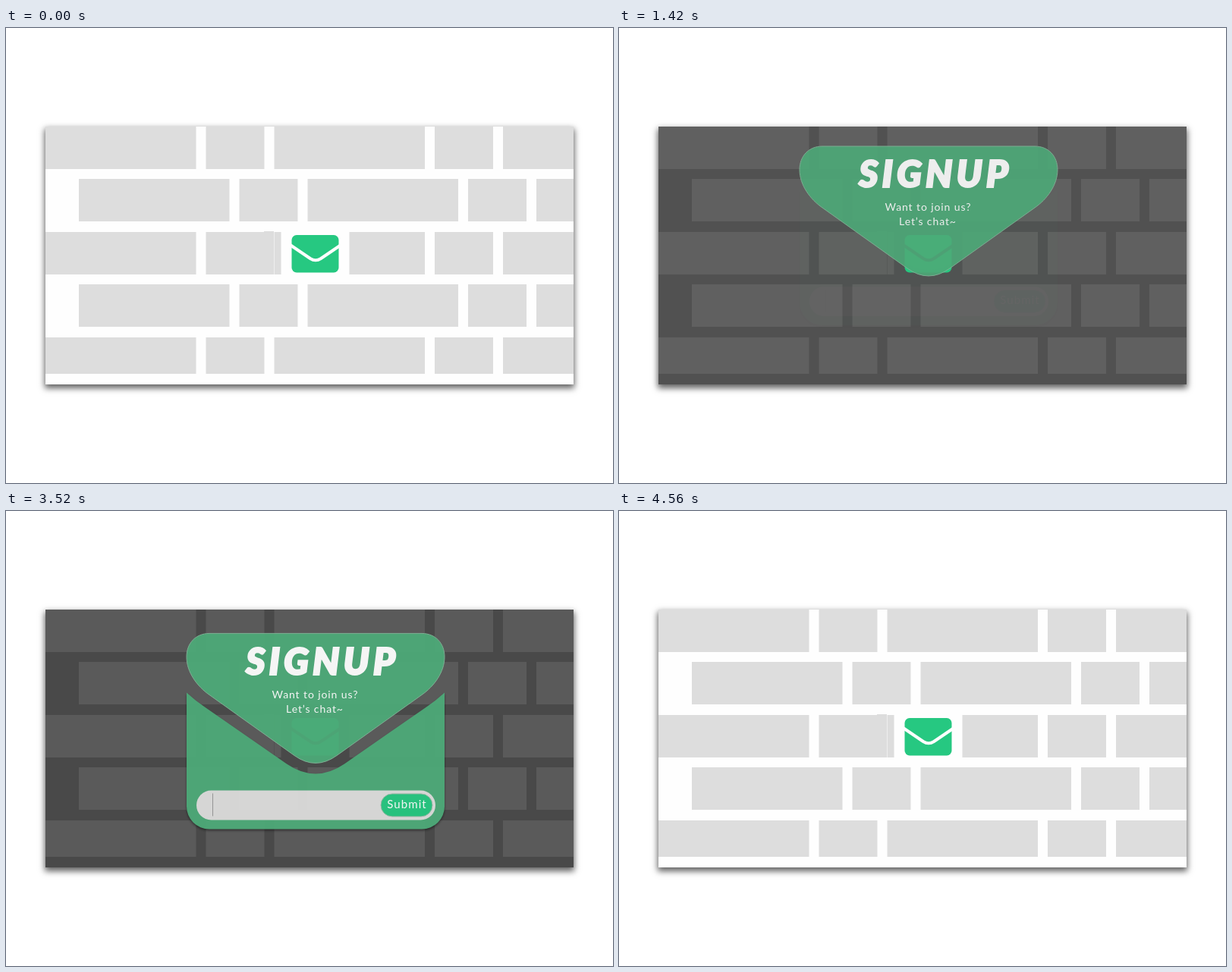
Write an HTML page that moves like this. It is 800 by 600 pixels and loops after 4.62 s.

```html
<!DOCTYPE html>
<html lang="en">
<head>
<meta charset="utf-8">
<title>Envelope signup</title>
<style>
  html, body { margin: 0; width: 100%; height: 100%; overflow: hidden; background: #fff; }
  #card { position: absolute; left: 52px; top: 130px; width: 696px; height: 340px; overflow: hidden; box-shadow: 0 4px 8px 1px rgba(0, 0, 0, .62); }
  svg { display: block; font-family: Lato, sans-serif; }
  text { fill: #fff; text-anchor: middle; font-size: 14px; letter-spacing: .9px; }
  #title { font-size: 49px; font-weight: 900; font-style: italic; letter-spacing: 5px; stroke: #fff; stroke-width: 2px; }
  #submit { font-size: 15px; letter-spacing: 1.1px; }
  #body { filter: drop-shadow(0 2px 1.5px rgba(0, 0, 0, .45)); }
</style>
</head>
<body>
<div id="card">
<svg width="696" height="340" viewBox="52 130 696 340">
  <rect id="wall" x="52" y="130" width="696" height="340"/>
  <path id="bricks"/>
  <rect id="opening" x="362.500" y="268" width="90" height="57"/>
  <rect x="376.500" y="273" width="62" height="49.500" rx="6.500" fill="#26c881"/>
  <path id="fold" d="M373 285L401 304Q408 308.500 415 304L443 285" fill="none" stroke-width="4"/>
  <g id="body">
    <path d="M238 246Q250 257 262 265L370 340Q408 366 446 340L554 265Q566 257 578 246V396A30 30 0 0 1 548 426H268A30 30 0 0 1 238 396Z" fill="#4daa78"/>
    <rect x="251" y="375" width="315" height="39" rx="19.500" fill="#dededd"/>
    <path d="M272.500 379V409" stroke="#999"/>
    <rect x="494" y="379.500" width="68" height="30" rx="15" fill="#26c881" stroke="#9dbcaa"/>
    <text id="submit" x="528.500" y="398.500">Submit</text>
  </g>
  <g id="lid">
    <path d="M268 168H548C566 168 578 181 578 199C578 219 564 238 548 249L436 329Q408 349 380 329L268 249C252 238 238 219 238 199C238 181 250 168 268 168Z" fill="#4daa78" stroke="#80b497"/>
    <text id="title" x="417" y="222.500">SIGNUP</text>
    <text x="407.500" y="253.500">Want to join us?</text>
    <text x="407" y="272.500">Let’s chat~</text>
  </g>
</svg>
</div>
<script>
const LOOP = 4620, MOVE = 490, RISE = 120, DROP = 22;
const $ = id => document.getElementById(id);

const box = (left, top, right, bottom) => `M${left} ${top}H${right}V${bottom}H${left}Z`;

// Long and short bricks alternate; every second row is shifted
function brickwork() {
  let path = box(340, 268, 353, 325); // closes the joint beside the icon
  for (let row = 0; row < 5; row++) {
    const top = 130 + Math.floor(69.5 * row);
    const bottom = Math.min(top + 56, 456);
    for (let x = row % 2 ? 96 : 52, long = true; x < 748; long = !long) {
      const width = long ? 198.5 : 77;
      path += box(x, top, x + width, bottom);
      x += width + 13;
    }
  }
  return path;
}

// Quartic ease in and out, beginning at the given time
function ease(time, start) {
  const u = Math.min(1, Math.max(0, (time - start) / MOVE));
  return u < .5 ? 8 * u ** 4 : 1 - 8 * (1 - u) ** 4;
}

function gray(from, to, amount) {
  const v = Math.round(from + (to - from) * amount);
  return `rgb(${v},${v},${v})`;
}

function place(part, y, opacity) {
  part.setAttribute("transform", `translate(0 ${y})`);
  part.setAttribute("opacity", opacity);
}

function draw(now) {
  const t = now % LOOP;
  const shown = ease(t, 1095) - ease(t, 3380);
  const rise = RISE * (shown - 1);
  const gap = gray(254, 62, shown);
  $("wall").setAttribute("fill", gap);
  $("opening").setAttribute("fill", gap);
  $("fold").setAttribute("stroke", gap);
  $("bricks").setAttribute("fill", gray(221, 82, shown));
  place($("lid"), rise, shown);
  place($("body"), rise + DROP * (ease(t, 1650) - 1), Math.min(shown, ease(t, 1302)));
  requestAnimationFrame(() => draw(performance.now()));
}

$("bricks").setAttribute("d", brickwork());
draw(0);
</script>
</body>
</html>
```
